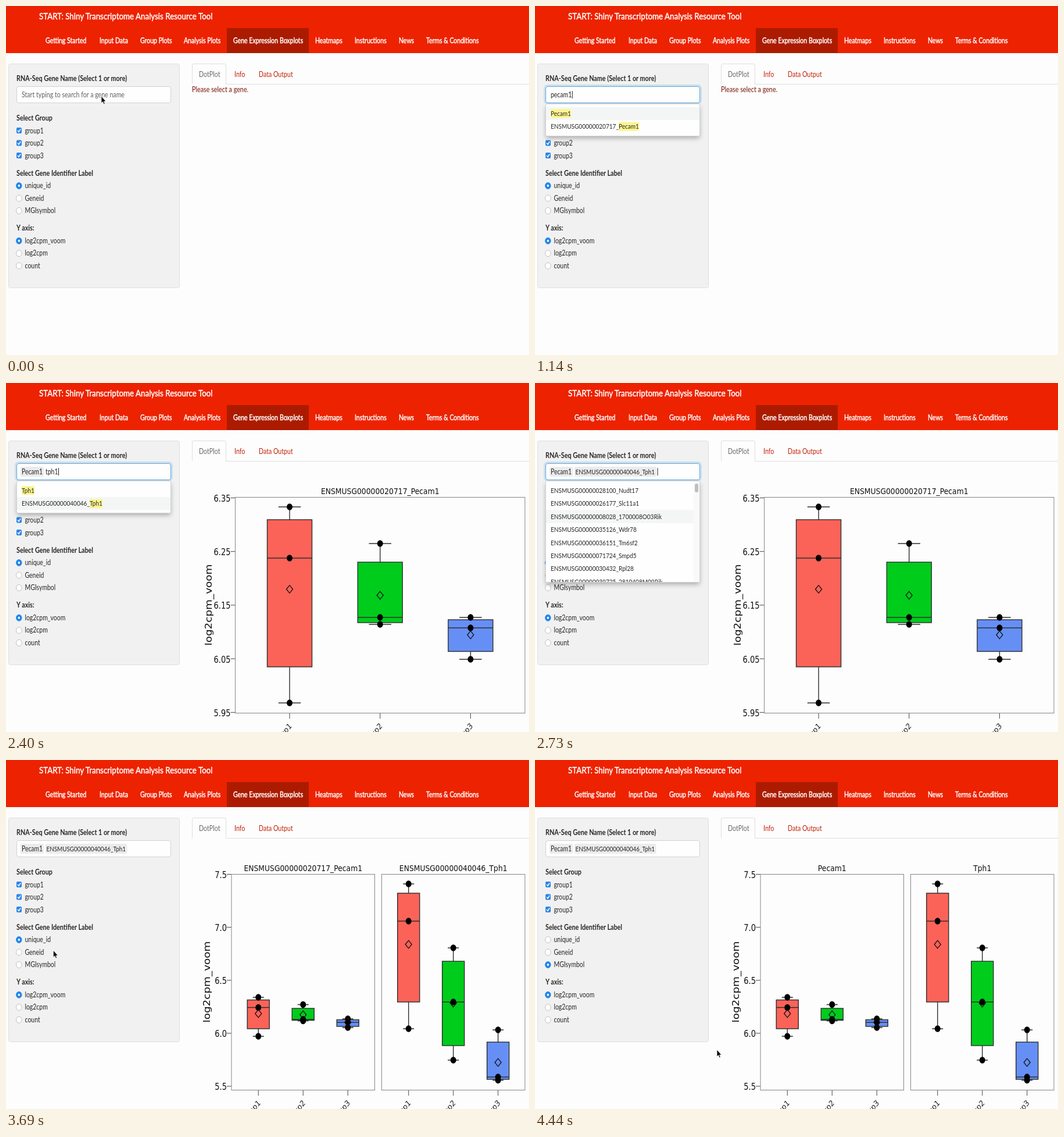
These frames come from a looping animation (900 px wide and 600 px high, 4.47 s). An HTML page:

```html
<!DOCTYPE html>
<html lang="en">
<head>
<meta charset="utf-8">
<title>Gene expression boxplots</title>
<style>
html, body { margin: 0; width: 100%; height: 100%; overflow: hidden; background: #fdfdfd; }
svg { display: block; width: 900px; height: 600px; font-family: Lato, sans-serif; }
.plot text { font-family: "DejaVu Sans", sans-serif; }
</style>
</head>
<body>
<svg id="stage" viewBox="0 0 900 600">
  <defs>
    <clipPath id="menuClip"><rect x="19" y="169" width="264" height="173"/></clipPath>
    <filter id="soft" x="-20%" y="-20%" width="140%" height="160%"><feGaussianBlur stdDeviation="4"/></filter>
  </defs>
  <g id="page"></g>
  <g id="live"></g>
  <g id="mouse"></g>
</svg>
<script>
const LOOP = 4470;
const SQUEEZE = 0.83; // the whole screen is narrowed horizontally
const INK = '#262626';
const BACK = '#fdfdfd';
const byId = id => document.getElementById(id);
const pen = document.createElement('canvas').getContext('2d');

const T = {
  focus: 120, pick1: 1230, plot1: 1440, pick2: 2610, plot2: 2970,
  hand: 3180, close: 3600, radio: 3900, relabel: 4260
};
const WORDS = [
  { word: 'pecam1', from: 570, step: 90 },
  { word: 'tph1', from: 1530, step: 90 }
];

const PECAM = 'ENSMUSG00000020717_Pecam1';
const TPH = 'ENSMUSG00000040046_Tph1';
const ens = list => list.map(s => 'ENSMUSG000000' + s);
const GENES = ens(['28100_Nudt17', '26177_Slc11a1', '08028_1700008O03Rik', '35126_Wdr78',
  '36151_Tm6sf2', '71724_Smpd5', '30432_Rpl28', '39725_2810408M09Rik']);
const T_GENES = ens(['27288_Zfp438', '30505_Prmt3', '68922_Msto1', '12609_Ttll5', '42428_Mgat3',
  '91455_Otogl', '02489_Tiam1', '28100_Nudt17', '36151_Tm6sf2']);

const clamp = v => Math.min(1, Math.max(0, v));

function width(s, size) {
  pen.font = `${size}px Lato, sans-serif`;
  return pen.measureText(s).width * SQUEEZE;
}

function text(s, x, y, size = 13, fill = INK, extra = '', turn = 0) {
  const body = s.replace(/&/g, '&amp;');
  return `<text transform="translate(${x} ${y}) scale(${SQUEEZE} 1) rotate(${turn})" font-size="${size}" fill="${fill}" ${extra}>${body}</text>`;
}

function rect(x, y, w, h, fill, extra = '') {
  return `<rect x="${x}" y="${y}" width="${w}" height="${h}" fill="${fill}" ${extra}/>`;
}

function path(d, stroke, extra = '') {
  return `<path d="${d}" fill="none" stroke="${stroke}" ${extra}/>`;
}

function page() {
  const bold = 'font-weight="700"';
  const thick = 'stroke="#fff" stroke-width=".5"';
  const nav = [['Getting Started', 68], ['Input Data', 161], ['Group Plots', 231], ['Analysis Plots', 306],
    ['Gene Expression Boxplots', 391], ['Heatmaps', 532], ['Instructions', 600], ['News', 676],
    ['Terms & Conditions', 723]];
  let s = rect(0, 0, 900, 600, BACK) + rect(0, 0, 900, 81, '#ed2200') +
    rect(380, 38, 141, 43, '#ac1b00') +
    text('START: Shiny Transcriptome Analysis Resource Tool', 57, 22.5, 16.1, '#fff', thick) +
    nav.map(([n, x]) => text(n, x, 64, 12.7, '#fff', thick)).join('');

  s += rect(4.5, 99.5, 294, 385, '#f1f1f1', 'rx="3" stroke="#dfdfdf"');
  const heads = [['RNA-Seq Gene Name (Select 1 or more)', 129], ['Select Group', 197],
    ['Select Gene Identifier Label', 291.5], ['Y axis:', 386]];
  s += heads.map(([h, y]) => text(h, 18, y, 13, INK, bold)).join('');
  for (let i = 0; i < 3; i++) {
    const y = 214 + i * 21.5;
    s += rect(18, y - 5, 9, 10, '#2b86e6', 'rx="2"') +
      path(`M20 ${y}l2 2.5l3.2 -5`, '#fff', 'stroke-width="1.4"') +
      text('group' + (i + 1), 32.5, y + 4.5, 12.4);
  }
  s += path('M320.5 134V102q0 -2.5 2.5 -2.5H376q2.5 0 2.5 2.5V134.5H900', '#dedede') +
    text('DotPlot', 332, 121.5, 12.9, '#686868') +
    text('Info', 393, 121.5, 12.9, '#c42008') +
    text('Data Output', 435, 121.5, 12.8, '#c42008');
  return s;
}

function radios(names, top, chosen) {
  return names.map((name, i) => {
    const y = top + i * 21.5;
    const on = i === chosen;
    return `<ellipse cx="22.3" cy="${y}" rx="4.8" ry="5.5" fill="${on ? '#2086ea' : '#fff'}" stroke="${on ? '#2086ea' : '#b0b0b0'}" stroke-width=".8"/>` +
      (on ? `<ellipse cx="22.3" cy="${y}" rx="1.7" ry="2" fill="#fff"/>` : '') +
      text(name, 32.5, y + 4, 12.6);
  }).join('');
}

function searchBox(st) {
  const chip = (x, w) => rect(x, 144, w, 17, '#ebebeb', 'rx="2"');
  let s = '';
  if (st.open) s += rect(16.5, 136.5, 269, 31, 'none', 'rx="5" stroke="#cbdfec" stroke-width="3"');
  s += rect(18.5, 138.5, 265, 28, '#fefefe', `rx="3.5" stroke="${st.open ? '#62a8dc' : '#d2d2d2'}"`);
  let x = 27;
  if (st.picked > 0) {
    s += chip(25, 40) + text('Pecam1', 27, 156.5, 12.5);
    x = 68;
  }
  if (st.picked > 1) {
    s += chip(68, 140.5) + text(TPH, 69.5, 156.5, 11.9);
    x = 210;
  }
  if (!st.picked && !st.typed) s += text('Start typing to search for a gene name', 27, 156.5, 12.8, '#606060');
  if (st.typed) s += text(st.typed, x, 156.5, 12.6);
  if (st.open) s += rect(x + (st.typed ? width(st.typed, 12.6) + 0.5 : 0.5), 146, 1, 13, '#222');
  return s;
}

function option(name, y, query) {
  const size = 12.1;
  let s = '';
  if (query) {
    for (const m of name.matchAll(new RegExp(query + '+', 'gi'))) {
      // identifiers match only after the underscore
      if (m.index < name.indexOf('_')) continue;
      s += rect(27 + width(name.slice(0, m.index), size), y - 7.5, width(m[0], size), 15, '#fcf58e');
    }
  }
  return s + text(name, 27, y + 4.3, size);
}

function menu(st) {
  if (!st.open) return '';
  const { rows, query, top, active, thumb } = st.list;
  const long = rows.length > 2;
  const h = long ? 173 : 54;
  const lines = rows.map((name, i) => {
    const y = top + i * 22.35;
    return (i === active ? rect(19, y - 11, long ? 254 : 264, 22.3, '#f4f6f6') : '') + option(name, y, query);
  }).join('');
  return rect(19, 173, 264, h, '#000', 'opacity=".3" filter="url(#soft)"') +
    rect(18.5, 168.5, 265, h + 1, '#fefefe', 'rx="2" stroke="#d4d4d4"') +
    `<g clip-path="url(#menuClip)">${lines}` +
    (long ? rect(273, 169, 10, 173, '#f9f9f9') + rect(275, thumb, 6, 15, '#bfbfbf', 'rx="3"') : '') + '</g>';
}

// values: upper whisker, box top, median, box bottom, lower whisker, mean
function box(cx, half, fill, [hi, q3, med, q1, lo, mean]) {
  const line = '#2e2e2e';
  const cap = half / 2;
  return path(`M${cx} ${hi}V${q3}M${cx} ${q1}V${lo}M${cx - cap} ${hi}h${half}M${cx - cap} ${lo}h${half}`, line, 'stroke-width="1.4"') +
    rect(cx - half, q3, half * 2, q1 - q3, fill, `stroke="${line}" stroke-width="1.4"`) +
    path(`M${cx - half} ${med}h${half * 2}`, line, 'stroke-width="1.6"') +
    [hi, med, lo].map(y => `<ellipse cx="${cx}" cy="${y}" rx="5" ry="5.8"/>`).join('') +
    path(`M${cx - 5.5} ${mean}l5.5 -6.8l5.5 6.8l-5.5 6.8z`, '#111', 'stroke-width="1.3"');
}

function panel(x, w, title, step, half, stats) {
  const mid = x + w / 2;
  const fills = ['#fc6358', '#00cc1c', '#668ff6'];
  return rect(x, 196.5, w, 371, 'none', 'stroke="#858585"') +
    text(title, mid, 190.5, 14.9, '#111', 'text-anchor="middle"') +
    stats.map((v, i) => {
      const cx = mid + (i - 1) * step;
      return box(cx, half, fills[i], v) + path(`M${cx} 568v9`, '#444') +
        text('group' + (i + 1), cx + 4.5, 590.5, 14, '#222', 'text-anchor="end"', -45);
    }).join('');
}

function axis(x, first, step, digits, y0, gap, labelX) {
  let s = text('log2cpm_voom', labelX, 381.5, 18.4, '#111', 'text-anchor="middle"', -90);
  for (let i = 0; i < 5; i++) {
    const y = y0 + i * gap;
    s += path(`M${x - 8} ${y}h8`, '#444') +
      text((first - i * step).toFixed(digits), x - 8, y + 6.5, 15.7, '#111', 'text-anchor="end"');
  }
  return s;
}

function plot(st) {
  if (!st.plot) return text('Please select a gene.', 320, 148, 13, '#7a1408', `opacity="${st.fade}"`);
  let s;
  if (st.plot === 1) {
    s = axis(394.5, 6.35, 0.1, 2, 197.5, 92.2, 354) +
      panel(394.5, 498.5, PECAM, 155.7, 38.5, [
        [213, 235, 301, 488, 550, 354.5],
        [276, 308, 403, 412, 415, 365],
        [403, 407, 421, 461.5, 475, 433]]);
  } else {
    const short = st.plot === 3;
    s = axis(388, 7.5, 0.5, 1, 196.5, 91.1, 350.5) +
      panel(388, 246.5, short ? 'Pecam1' : PECAM, 77, 19, [
        [408, 412.5, 425.5, 462, 475, 436],
        [420.5, 427, 446, 447.5, 448.5, 438],
        [445, 446.5, 451, 458, 460, 451]]) +
      panel(646.5, 246.5, short ? 'Tph1' : TPH, 77, 19, [
        [213, 229, 277, 416, 462, 317],
        [323, 346, 416, 491, 516, 418],
        [464, 485, 545, 549, 550.5, 520]]);
  }
  return `<g class="plot" opacity="${st.fade}">${s}</g>`;
}

// the output dims a moment after each change, until the new plot arrives
function fadeAt(t) {
  const waits = [[T.pick1, T.plot1], [T.pick2, T.plot2], [T.radio, T.relabel]];
  const wait = waits.find(([from, to]) => t >= from && t < to);
  return wait ? 1 - 0.7 * clamp((t - wait[0] - 150) / 120) : 1;
}

function listAt(typed, picked, t) {
  if (picked < 2 && typed.length > 2) {
    const rows = picked ? ['Tph1', TPH] : ['Pecam1', PECAM];
    return { rows, query: typed, top: 184.8, active: picked && t > 2250 ? 1 : 0 };
  }
  if (picked === 1 && typed) return { rows: T_GENES, query: 't', top: 164.9, active: 7, thumb: 246 };
  return { rows: GENES, query: '', top: 184.8, active: picked > 1 ? 2 : 0, thumb: 173 };
}

function typedAt(t, picked) {
  const w = WORDS[picked];
  return w ? w.word.slice(0, Math.max(0, Math.floor((t - w.from) / w.step) + 1)) : '';
}

function stateAt(t) {
  const picked = t < T.pick1 ? 0 : t < T.pick2 ? 1 : 2;
  const typed = typedAt(t, picked);
  return {
    picked, typed,
    open: t >= T.focus && t < T.close,
    list: listAt(typed, picked, t),
    plot: t < T.plot1 ? 0 : t < T.plot2 ? 1 : t < T.relabel ? 2 : 3,
    label: t < T.radio ? 0 : 2,
    fade: fadeAt(t)
  };
}

function mouseAt(t) {
  if (t >= WORDS[0].from && t < T.hand) return '';
  const stops = [[0, 164, 155], [T.hand, 164, 155], [3330, 228, 266], [3420, 228, 266],
    [3840, 22, 352], [3930, 22, 352], [4140, 308, 426], [4440, 313, 498], [LOOP, 313, 498]];
  const i = stops.findIndex(p => p[0] > t);
  const [a, b] = [stops[i - 1], stops[i]];
  const u = (t - a[0]) / (b[0] - a[0]);
  const e = u * u * (3 - 2 * u);
  const x = a[1] + (b[1] - a[1]) * e;
  const y = a[2] + (b[2] - a[2]) * e;
  const hand = t >= T.hand && t < T.close && y > 169 && y < 342;
  const shape = hand
    ? '<path d="M-2.5 9V1.5q0 -1.5 1.2 -1.5t1.2 1.5V5q1.5 -.8 2.2 .6q1.6 -.6 2.2 .8q1.7 -.2 1.7 1.6q0 3 -1.5 5V15H-1.2V13L-5 8.6q-.8 -1.5 .8 -1.5z" fill="#fff" stroke="#111" stroke-width="1.1"/>'
    : '<path d="M0 0V12L2.6 9.6L4.3 13.8L6.2 12.8L4.5 9H8Z" stroke="#fff" stroke-width=".8"/>';
  return `<g transform="translate(${x.toFixed(2)} ${y.toFixed(2)})">${shape}</g>`;
}

let last = '';
function draw(t) {
  const st = stateAt(t);
  const key = JSON.stringify(st);
  if (key !== last) {
    last = key;
    byId('live').innerHTML = radios(['unique_id', 'Geneid', 'MGIsymbol'], 309, st.label) +
      radios(['log2cpm_voom', 'log2cpm', 'count'], 403.7, 0) +
      plot(st) + searchBox(st) + menu(st);
  }
  byId('mouse').innerHTML = mouseAt(t);
}

byId('page').innerHTML = page();
const start = performance.now();
function tick(now) {
  draw(Math.max(0, now - start) % LOOP);
  requestAnimationFrame(tick);
}
draw(0);
requestAnimationFrame(tick);
</script>
</body>
</html>
```
